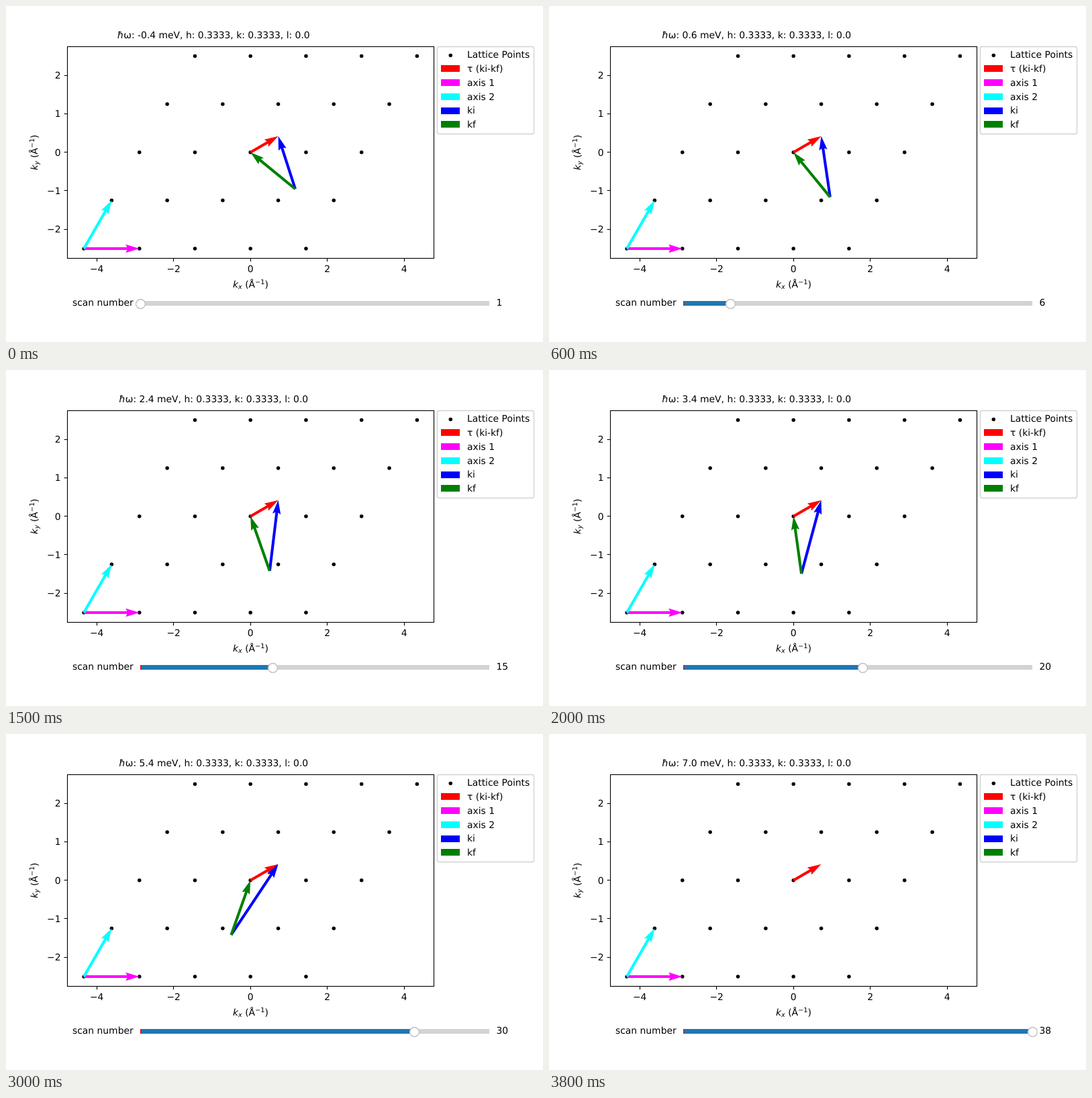
An HTML page for the animation above (3.9 s loop, 800 by 500 pixels).

```html
<!DOCTYPE html>
<html lang="en">
<head>
<meta charset="utf-8">
<title>Scattering triangle scan</title>
<style>
  html, body { margin: 0; width: 100%; height: 100%; overflow: hidden; background: #fff; }
  svg { display: block; width: 800px; height: 500px; }
  text {
    font: 13.89px "DejaVu Sans", sans-serif;
    text-rendering: geometricPrecision;
    white-space: pre;
  }
  .mid { text-anchor: middle; }
  .end { text-anchor: end; }
  .it { font-style: italic; }
  .small { font-size: 9.72px; }
</style>
</head>
<body>
<svg viewBox="0 0 800 500">
  <g id="dots"></g>
  <g id="arrows"></g>
  <g id="axes" fill="none" stroke="#000" stroke-width="1.11">
    <rect x="91.5" y="60.5" width="546" height="315"/>
  </g>
  <g id="labels">
    <text class="mid" x="309.2" y="48"><tspan class="it">ħ</tspan>ω: <tspan id="energy">-0.4</tspan> meV, h: 0.3333, k: 0.3333, l: 0.0</text>
  </g>
  <g id="legend">
    <rect x="642.5" y="60.5" width="144" height="130" rx="2.8" fill="#fff" stroke="#ccc" stroke-opacity=".85" stroke-width="1.39"/>
  </g>
  <g id="slider">
    <rect x="200" y="439" width="520" height="7" fill="#d3d3d3"/>
    <rect id="fill" x="200" y="439" height="7" fill="#1f77b4"/>
    <rect x="200" y="439" width="1.4" height="7" fill="#f00"/>
    <circle id="knob" cy="443.4" r="6.95" fill="#fff" stroke="#bfbfbf" stroke-width="1.39"/>
    <text class="end" x="189.7" y="446">scan number</text>
    <text id="count" x="730.5" y="446">1</text>
  </g>
</svg>
<script>
  const $ = id => document.getElementById(id);

  function add(parent, tag, attrs, content = '') {
    const el = document.createElementNS('http://www.w3.org/2000/svg', tag);
    for (const key in attrs) el.setAttribute(key, attrs[key]);
    el.innerHTML = content;
    return parent.appendChild(el);
  }

  // Plot coordinates
  const UNIT = 57.25;
  const toX = x => 364.2 + x * UNIT;
  const toY = y => 217.7 - y * UNIT;

  // Hexagonal lattice and scattering constants
  const A = 1.445;
  const ROW = A * Math.sqrt(3) / 2;
  const site = (i, j) => [A * (i + j / 2), ROW * j];
  const TAU = site(1 / 3, 1 / 3);
  const TAU_LEN = Math.hypot(...TAU);
  const KF = 1.506;
  const MEV = 2.0721; // E = MEV * k²

  function dot(parent, x, y) {
    add(parent, 'circle', { cx: x, cy: y, r: 2.75 });
  }

  function arrowPath(from, to) {
    const x0 = toX(from[0]), y0 = toY(from[1]);
    const dx = toX(to[0]) - x0, dy = toY(to[1]) - y0;
    const len = Math.hypot(dx, dy), c = dx / len, s = dy / len;
    const w = 4.095, h = w / 2, neck = len - 4.5 * w, barb = len - 5 * w;
    const shape = [[0, h], [neck, h], [barb, 3 * h], [len, 0], [barb, -3 * h], [neck, -h], [0, -h]];
    const pts = shape.map(([u, v]) =>
      (x0 + u * c - v * s).toFixed(2) + ' ' + (y0 + u * s + v * c).toFixed(2));
    return 'M' + pts.join('L') + 'Z';
  }

  function arrow(color, from, to) {
    return add($('arrows'), 'path', { fill: color, d: from ? arrowPath(from, to) : '' });
  }

  for (let j = -2; j <= 2; j++)
    for (let i = -2; i <= 2; i++) {
      const [x, y] = site(i, j);
      dot($('dots'), toX(x), toY(y));
    }

  const corner = site(-2, -2);
  arrow('#f00', [0, 0], TAU);
  arrow('#f0f', corner, site(-1, -2));
  arrow('#0ff', corner, site(-2, -1));
  const ki = arrow('#00f');
  const kf = arrow('#008000');

  // Ticks and axis labels
  const snap = v => Math.floor(v) + 0.5;
  const signed = v => String(v).replace('-', '−');
  for (let v = -4; v <= 4; v += 2) {
    add($('axes'), 'path', { d: `M${snap(toX(v))} 375.5v4.9` });
    add($('labels'), 'text', { class: 'mid', x: toX(v), y: 396 }, signed(v));
  }
  for (let v = -2; v <= 2; v++) {
    add($('axes'), 'path', { d: `M91.5 ${snap(toY(v))}h-4.9` });
    add($('labels'), 'text', { class: 'end', x: 81.5, y: Math.round(toY(v) + 5) }, signed(v));
  }
  const axisName = s => `<tspan class="it">k</tspan><tspan class="it small" dy="2.3">${s}</tspan>` +
    '<tspan dy="-2.3"> (Å</tspan><tspan class="small" dy="-5.2">−1</tspan><tspan dy="5.2">)</tspan>';
  add($('labels'), 'text', { class: 'mid', x: 364.4, y: 419 }, axisName('x'));
  add($('labels'), 'text', { class: 'mid', transform: 'translate(47 217.9) rotate(-90)' }, axisName('y'));

  // Legend
  const entries = [['Lattice Points'], ['τ (ki-kf)', '#f00'], ['axis 1', '#f0f'],
    ['axis 2', '#0ff'], ['ki', '#00f'], ['kf', '#008000']];
  entries.forEach(([name, color], i) => {
    const y = 77.2 + 20.8 * i;
    if (color) add($('legend'), 'rect', { x: 648, y: Math.round(y - 9.8), width: 28, height: 10, fill: color });
    else dot($('legend'), 662.3, 73.4);
    add($('legend'), 'text', { x: 687, y: Math.round(y) }, name);
  });

  // Common tail of ki and kf, or null when the triangle cannot close
  function vertex(energy) {
    const along = (TAU_LEN ** 2 - energy / MEV) / 2 / TAU_LEN;
    const rest = KF ** 2 - along ** 2;
    if (rest < 0) return null;
    const across = Math.sqrt(rest);
    const [ux, uy] = TAU.map(v => v / TAU_LEN);
    return [along * ux + across * uy, along * uy - across * ux];
  }

  let shown = 0;
  function show(n) {
    if (n === shown) return;
    shown = n;
    const energy = (n - 3) / 5;
    const tail = vertex(energy);
    ki.setAttribute('d', tail ? arrowPath(tail, TAU) : '');
    kf.setAttribute('d', tail ? arrowPath(tail, [0, 0]) : '');
    const pos = 520 * (n - 1) / 37;
    $('fill').setAttribute('width', pos);
    $('knob').setAttribute('cx', Math.round(200 + pos) + 0.5);
    $('energy').textContent = energy.toFixed(1);
    $('count').textContent = n;
  }

  function tick() {
    show(Math.max(1, Math.floor(performance.now() % 3900 / 100)));
    requestAnimationFrame(tick);
  }
  tick();
</script>
</body>
</html>
```
